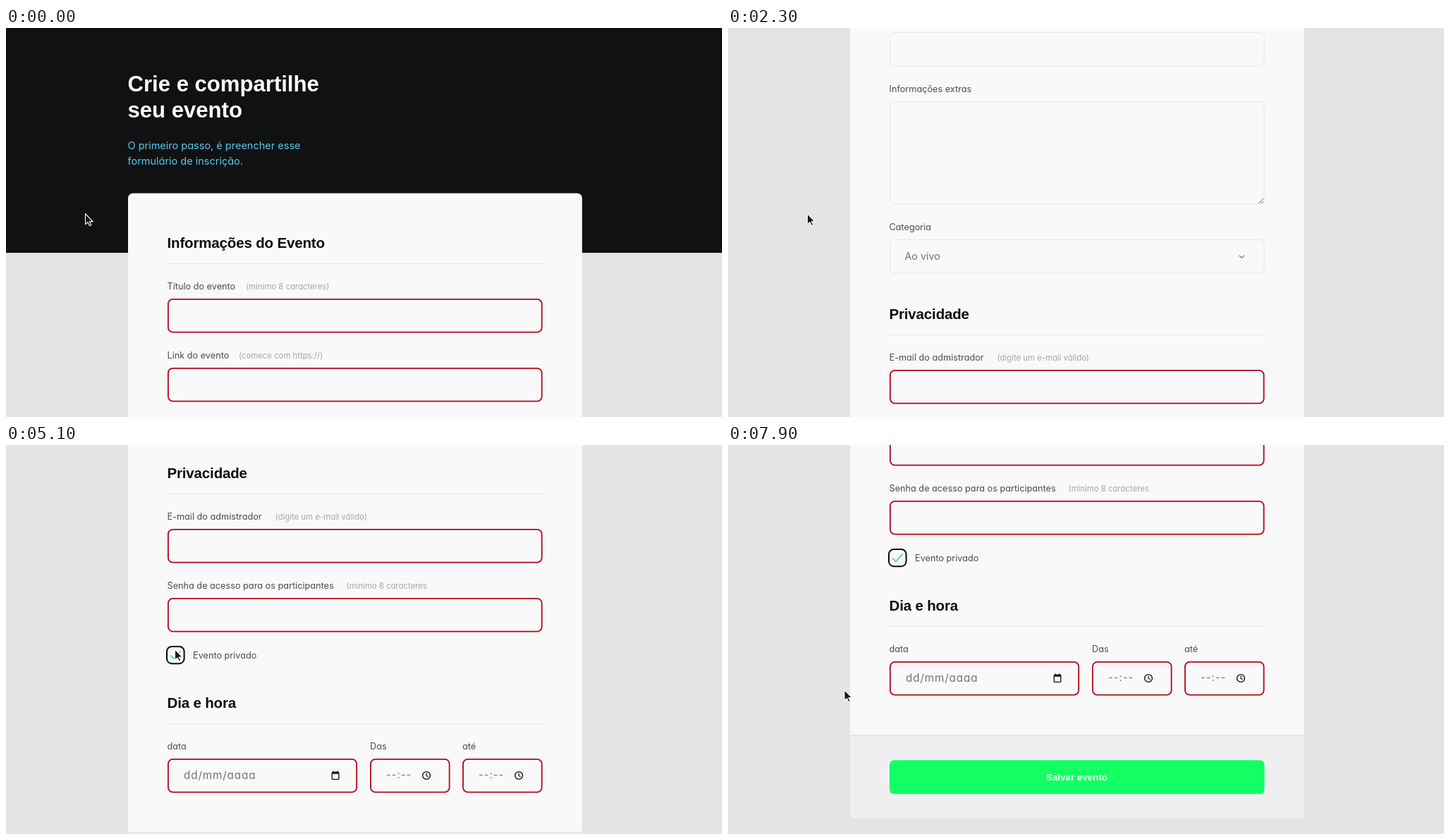
Write an HTML page that moves like this. It is 1015 by 552 pixels and loops after 8000 ms.

```html
<!DOCTYPE html>
<html lang="pt-BR">
<head>
<meta charset="utf-8">
<title>Crie e compartilhe seu evento</title>
<style>
  html, body { margin: 0; width: 100%; height: 100%; overflow: hidden; background: #e4e4e2; }
  svg { display: block; width: 1015px; height: 552px; }
  text { white-space: pre; font-family: Inter, "Open Sans", sans-serif; font-feature-settings: "cv11"; }
  .title, .legend, .save { font-family: "Liberation Sans", Arial, sans-serif; font-weight: 700; }
  .title { font-size: 31.1px; fill: #fff; }
  .intro { font-size: 14.5px; fill: #5ac8ee; }
  .legend { font-size: 20.5px; letter-spacing: -.16px; fill: #0d0d0f; }
  .label { font-size: 12.7px; fill: #4e4958; }
  .hint { font-size: 11.35px; fill: #a6a4aa; }
  .value { font-size: 14.3px; fill: #747178; }
  .date { font-size: 15.2px; letter-spacing: .9px; fill: #747178; }
  .time { font-size: 14.5px; letter-spacing: 1.1px; fill: #747178; }
  .save { font-size: 13.4px; fill: #effff3; text-anchor: middle; }
</style>
</head>
<body>
<svg viewBox="0 0 1015 552" xmlns="http://www.w3.org/2000/svg">
  <g id="page"></g>
  <path id="cursor" d="M0 0V15.2L3.5 12L6 17.2L8.3 16.1L5.9 11.1H10.6Z"
    fill="#16161a" stroke="#fff" stroke-width="1.1" stroke-linejoin="round"/>
</svg>
<script>
const LOOP = 8000, TICK = 100;
const LEFT = 229, WIDTH = 531.5, FIELD_H = 48.5;

const text = (kind, x, y, content) => `<text class="${kind}" x="${x}" y="${y}">${content}</text>`;

const line = (points, color, width = 1, extra = '') =>
  `<polyline points="${points}" fill="none" stroke="${color}" stroke-width="${width}" ${extra}/>`;

function field(x, y, w, h, required) {
  const stroke = required ? 1.8 : 1;
  return `<rect x="${x + stroke / 2}" y="${y + stroke / 2}" width="${w - stroke}" height="${h - stroke}" rx="6.5"
    fill="#f9f9f9" stroke="${required ? '#b3061c' : '#e5e5e6'}" stroke-width="${stroke}"/>`;
}

const legend = (y, content) =>
  text('legend', LEFT - .5, y, content) + line(`${LEFT},${y + 22.5} 760.5,${y + 22.5}`, '#e4e4e6');

function labelled(y, label, { hint = '', hintX = 0, required = false, h = FIELD_H } = {}) {
  return text('label', LEFT - .5, y, label) + text('hint', hintX, y - .3, hint) +
    field(LEFT, y + 13, WIDTH, h, required);
}

const clock = (x, y) =>
  `<circle cx="${x}" cy="${y}" r="5.4" fill="none" stroke="#111" stroke-width="1.4"/>` +
  line(`${x},${y - 3.5} ${x},${y + .2} ${x + 2.6},${y + 1.8}`, '#111', 1.2);

const calendar = (x, y) =>
  `<rect x="${x - 4.8}" y="${y - 4.6}" width="9.6" height="10" rx="1" fill="none" stroke="#111" stroke-width="1.3"/>
   <path d="M${x - 5} ${y - 5.2}h10v3h-10zM${x - 3.6} ${y - 6.6}h1.4v2h-1.4zM${x + 2.2} ${y - 6.6}h1.4v2h-1.4z" fill="#111"/>`;

const timeField = (x, label) =>
  text('label', x, 1371.5, label) + field(x, 1385, 113.5, FIELD_H, true) +
  text('time', x + 23, 1413, '--:--') + clock(x + 80, 1409);

const header = `
  <rect width="1015" height="319" fill="#101113"/>
  ${text('title', 172.5, 90, 'Crie e compartilhe')}
  ${text('title', 172.5, 127, 'seu evento')}
  ${text('intro', 172.5, 171.7, 'O primeiro passo, é preencher esse')}
  ${text('intro', 172.5, 194.3, 'formulário de inscrição.')}`;

const card = `
  <rect x="173" y="234.5" width="643.7" height="1373.5" rx="7" fill="#f9f9f9"/>
  <path d="M173 1489.5H816.7V1601a7 7 0 0 1-7 7H180a7 7 0 0 1-7-7Z" fill="#efeff1"/>
  ${line('173,1490 816.7,1490', '#dadadf')}`;

const eventInfo = legend(312, 'Informações do Evento') +
  labelled(371, 'Título do evento', { hint: '(mínimo 8 caracteres)', hintX: 340, required: true }) +
  labelled(469, 'Link do evento', { hint: '(comece com https://)', hintX: 330, required: true }) +
  labelled(567, 'Momprosa para contato', { hint: '(somente números)', hintX: 390 }) +
  labelled(665, 'Informações extras', { h: 146.5 }) +
  line('752,823 759,816', '#666') + line('756,823 759,820', '#666') +
  labelled(861, 'Categoria') +
  text('value', 250.5, 903, 'Ao vivo') +
  line('724.7,896.8 728.2,900.2 731.7,896.8', '#85828a', 1.5);

const privacy = legend(987, 'Privacidade') +
  labelled(1046, 'E-mail do admistrador', { hint: '(digite um e-mail válido)', hintX: 381.5, required: true }) +
  labelled(1144, 'Senha de acesso para os participantes', { hint: '(mínimo 8 caracteres', hintX: 482.5, required: true }) +
  field(LEFT, 1226.5, 23, 23) +
  `<g id="checked">
    <rect x="228" y="1226" width="24.6" height="24.2" rx="7" fill="#f9f9f9" stroke="#0b0b0d" stroke-width="2"/>
    ${line('233.3,1238.6 238,1243.4 247.6,1232.6', '#5ac8ee', 1.8)}
  </g>` +
  text('label', 265, 1242.5, 'Evento privado');

const schedule = legend(1313, 'Dia e hora') +
  text('label', LEFT - .5, 1371.5, 'data') +
  field(LEFT, 1385, 269, FIELD_H, true) +
  text('date', 252, 1414, 'dd/mm/aaaa') + calendar(467, 1409) +
  timeField(516, 'Das') + timeField(647, 'até');

const saveButton = `
  <rect id="save" x="229" y="1525.3" width="531.5" height="48" rx="6.5"/>
  ${text('save', 494.5, 1554, 'Salvar evento')}`;

const page = document.getElementById('page');
page.innerHTML = header + card + eventInfo + privacy + schedule + saveButton;
const cursor = document.getElementById('cursor');
const checked = document.getElementById('checked');
const save = document.getElementById('save');

// Each track lists [time, ...values].
const scrollTrack = [
  [600, 0], [700, 15], [800, 70], [1200, 300], [1300, 334], [1500, 345], [1800, 345], [1900, 346], [2000, 346],
  [2100, 395], [2300, 574], [2500, 702], [2800, 802], [2900, 802], [3000, 804], [3200, 804],
  [3300, 818], [3500, 872], [3700, 924], [3800, 935], [3900, 940], [6000, 940],
  [6100, 968], [6200, 1015], [6300, 1054], [6400, 1078]
];
const cursorTrack = [
  [4100, 112.5, 263.5], [4200, 160, 283], [4300, 200, 290], [4400, 200, 290],
  [4700, 228, 278], [5000, 239.5, 290], [5500, 239.5, 290], [5600, 177.5, 372.5],
  [6600, 177.5, 372.5], [6700, 212, 386], [6900, 300, 413.5], [7000, 300, 413.5],
  [7400, 400, 468], [7500, 400, 468], [7900, 165, 347.5]
];
const checkTrack = [[4800, 0], [5000, 1]];
const hoverTrack = [[7100, 0], [7300, 1], [7600, 1], [7800, 0]];

function sample(track, time) {
  const next = track.findIndex(key => key[0] > time);
  if (next === 0) return track[0].slice(1);
  if (next < 0) return track[track.length - 1].slice(1);
  const from = track[next - 1], to = track[next];
  const mix = (time - from[0]) / (to[0] - from[0]);
  return from.slice(1).map((value, i) => value + (to[i + 1] - value) * mix);
}

function draw(now) {
  const time = Math.floor((now % LOOP) / TICK) * TICK;
  const [scroll] = sample(scrollTrack, time);
  const [x, y] = sample(cursorTrack, time);
  const [hover] = sample(hoverTrack, time);
  page.setAttribute('transform', `translate(0 ${-Math.round(scroll)})`);
  cursor.setAttribute('transform', `translate(${x} ${y})`);
  checked.setAttribute('opacity', sample(checkTrack, time)[0]);
  save.setAttribute('fill', `rgb(${19 - 8 * hover}, ${255 - 28 * hover}, ${100 - 10 * hover})`);
}

const start = performance.now();
function frame() {
  draw(performance.now() - start);
  requestAnimationFrame(frame);
}
frame();
</script>
</body>
</html>
```
